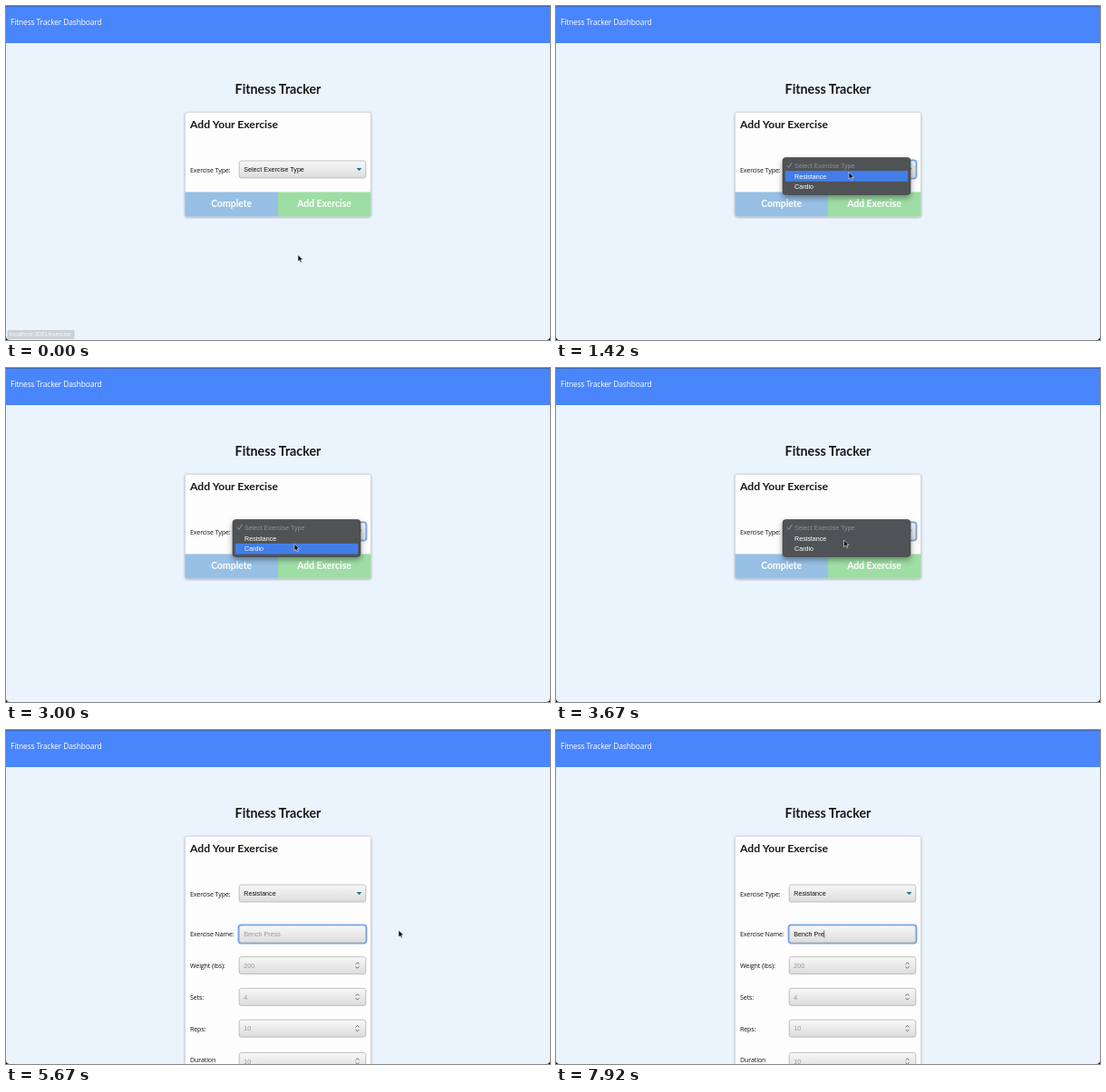
Write an HTML page that moves like this. It is 600 px wide and 369 px high and loops after 8000 ms.

```html
<!DOCTYPE html>
<html lang="en">
<head>
<meta charset="utf-8">
<title>Fitness Tracker</title>
<style>
  html, body { margin: 0; width: 100%; height: 100%; overflow: hidden; background: #000; }
  svg { display: block; width: 100%; height: 100%; }
  text { white-space: pre; }
  .nav { font: 8.5px "Open Sans", "Noto Sans", sans-serif; letter-spacing: -.17px; fill: #fff; }
  .label { font: 7.1px "Open Sans", "Noto Sans", sans-serif; letter-spacing: -.12px; fill: #111; }
  .head { font-family: Lato, sans-serif; font-weight: 700; fill: #17181a; }
  .btn { font: 700 10.4px Lato, sans-serif; fill: #fff; text-anchor: middle; }
  .ui { font: 7.15px "Liberation Sans", Arial, sans-serif; fill: #111; }
  .hint { fill: #999; }
  .item { fill: #fff; }
  .off { fill: #8f9193; }
  .status { font: 6.5px "Liberation Sans", Arial, sans-serif; fill: #fff; }
</style>
</head>
<body>
<svg viewBox="0 0 600 369" preserveAspectRatio="none">
  <defs>
    <linearGradient id="fieldFill" x2="0" y2="1">
      <stop offset="0" stop-color="#f8f8f8"/>
      <stop offset="1" stop-color="#dcdcdc"/>
    </linearGradient>
    <filter id="cardShadow" x="-10%" y="-10%" width="120%" height="125%">
      <feDropShadow dx="0" dy=".7" stdDeviation="1.2" flood-color="#425468" flood-opacity=".5"/>
    </filter>
    <filter id="menuShadow" x="-15%" y="-30%" width="130%" height="190%">
      <feDropShadow dx="0" dy="3" stdDeviation="3" flood-opacity=".38"/>
    </filter>
    <clipPath id="window"><path d="M0 0H600V365Q600 369 596 369H4Q0 369 0 365Z"/></clipPath>
  </defs>
  <rect width="600" height="369"/>
  <g clip-path="url(#window)">
    <rect width="600" height="369" fill="#ebf3fc"/>
    <rect width="600" height="41" fill="#4986fc"/>
    <rect width="600" height=".8" fill="#3a5fa8"/>
    <text class="nav" x="5" y="21.3">Fitness Tracker Dashboard</text>
    <text class="head" x="300" y="96.5" font-size="14.25" text-anchor="middle">Fitness Tracker</text>
    <rect id="card" x="197.5" y="117.5" width="205" height="115" rx="2.5" fill="#fdfdfd" stroke="#ccd1d7" stroke-width=".6" filter="url(#cardShadow)"/>
    <text class="head" x="203" y="134.8" font-size="12.2">Add Your Exercise</text>
    <g id="buttons">
      <path d="M197.5 205.5H300V232.5H200Q197.5 232.5 197.5 230Z" fill="#97c0e4"/>
      <path d="M300 205.5H402.5V230Q402.5 232.5 400 232.5H300Z" fill="#9edda4"/>
      <text class="btn" x="248.7" y="222.3">Complete</text>
      <text class="btn" x="351" y="222.3">Add Exercise</text>
    </g>
    <g id="form"></g>
    <g id="typeField"></g>
    <g id="menu">
      <rect x="250" y="167.5" width="141" height="41" rx="3.5" fill="#505254" stroke="#3b3d3f" stroke-width=".6" filter="url(#menuShadow)"/>
      <rect id="hover" x="252.8" width="135.4" height="11.8" fill="#437de8"/>
      <path d="M255 176.2L256.8 178.4L260.3 173.2" fill="none" stroke="#a3a5a7" stroke-width=".9"/>
      <text class="ui off" x="263" y="178.8">Select Exercise Type</text>
      <text class="ui item" x="263" y="190.6">Resistance</text>
      <text class="ui item" x="263" y="202.4">Cardio</text>
    </g>
    <g id="status">
      <rect x="1.5" y="358" width="74" height="10" rx="1.5" fill="#b9bec4"/>
      <text class="status" x="4" y="365.2">localhost:3001/exercise</text>
    </g>
    <path id="arrow" d="M0 0V7.6L1.8 6L3 8.7L4.3 8.1L3.1 5.5H5.5Z" fill="#000" stroke="#fff" stroke-width=".6"/>
    <path id="beam" d="M-1.5 -4.5Q0 -4.5 0 -3.5Q0 -4.5 1.5 -4.5M0 -3.5V3.5M-1.5 4.5Q0 4.5 0 3.5Q0 4.5 1.5 4.5" fill="none" stroke="#222" stroke-width=".7"/>
  </g>
</svg>
<script>
const LOOP = 8000, FPS = 12;
const OPEN = 750, CLOSE = 3750, FOCUS = 4700, TYPE = 6420;
const $ = id => document.getElementById(id);
const show = (el, on) => el.setAttribute("visibility", on ? "visible" : "hidden");
const move = (el, x, y) => el.setAttribute("transform", `translate(${x} ${y})`);

const field = (y, value, { icon = "", ring = "", cls = "hint", id = "" } = {}) => `
  <rect id="${ring}" x="255.6" y="${y - 1.3}" width="142.8" height="22" rx="4" fill="#6ea2f3" visibility="hidden"/>
  <rect x="257.2" y="${y + .2}" width="139.6" height="19" rx="2.5" fill="url(#fieldFill)" stroke="#a9a9a9" stroke-width=".7"/>
  <text class="ui ${cls}" id="${id}" x="262.3" y="${y + 12.3}">${value}</text>
  ${icon && `<path d="${icon}" transform="translate(0 ${y + 9.7})"/>`}`;
const label = (y, text) => `<text class="label" x="203" y="${y}">${text}</text>`;

const caretDown = 'M386.6 -1.4H392.4L389.5 1.7Z" fill="#18799c';
const spinner = 'M385.6 -1.3L387.5 -3.2L389.4 -1.3M385.6 1.3L387.5 3.2L389.4 1.3" fill="none" stroke="#444" stroke-width=".8';

$("typeField").innerHTML = label(183.6, "Exercise Type:") +
  field(170.8, "", { icon: caretDown, ring: "typeRing", cls: "", id: "typeText" });

const numbers = [["Weight (lbs):", 250.4, 200], ["Sets:", 285.2, 4], ["Reps:", 320, 10]];
$("form").innerHTML = label(228.4, "Exercise Name:") +
  field(215.8, "", { ring: "nameRing", id: "nameText" }) +
  `<rect id="caret" y="221.3" width=".6" height="8.6" fill="#111"/>` +
  numbers.map(([name, y, n]) => label(y + 12.7, name) + field(y, n, { icon: spinner })).join("") +
  label(367.3, "Duration") + field(356.3, 10, { icon: spinner });

// pointer stops: time, x, y
const path = [
  [0, 322, 274.8], [160, 322, 274.8], [600, 324, 181], [900, 324, 181], [1200, 323, 183.3],
  [2000, 323, 185], [2450, 319, 196], [2900, 318, 194.3], [3180, 318, 194.3], [3400, 317.5, 190],
  [3760, 317.5, 190], [4000, 368, 210.8], [4300, 370, 214], [4550, 371, 226], [5150, 371, 226],
  [5550, 433, 221.3], [LOOP, 433, 221.3]
];
const keys = [0, 170, 330, 500, 670, 830, 1030, 1200, 1410];
const phrase = "Bench Press";

function pointer(t) {
  const i = Math.max(1, path.findIndex(p => p[0] > t));
  const [t0, x0, y0] = path[i - 1], [t1, x1, y1] = path[i];
  const k = (t - t0) / (t1 - t0), e = k * k * (3 - 2 * k);
  return [x0 + (x1 - x0) * e, y0 + (y1 - y0) * e];
}

function draw(t) {
  const picked = t >= CLOSE, open = t >= OPEN && !picked;
  const focused = t >= FOCUS, typing = t >= TYPE;
  const [x, y] = pointer(t);

  show($("buttons"), !picked);
  show($("form"), picked);
  $("form").style.display = picked ? "" : "none";
  $("card").setAttribute("height", picked ? 290 : 115);
  $("typeText").textContent = picked ? "Resistance" : "Select Exercise Type";
  show($("typeRing"), t >= OPEN && !focused);

  $("menu").style.display = open ? "" : "none";
  const blink = t >= 3640 && t < 3720;
  show($("hover"), open && y >= 182 && !blink);
  $("hover").setAttribute("y", y < 194 ? 182.1 : 193.9);

  $("status").setAttribute("opacity", Math.max(0, .65 * (1 - t / 250)));

  const count = keys.filter(k => t - TYPE >= k).length;
  const name = $("nameText");
  name.textContent = count ? phrase.slice(0, count) : phrase;
  name.setAttribute("class", count ? "ui" : "ui hint");
  show($("nameRing"), focused);
  show($("caret"), focused && (typing || (t - FOCUS) % 1000 < 500));
  const width = count && picked ? name.getComputedTextLength() : 0;
  $("caret").setAttribute("x", 262.2 + width);

  const inField = picked && y > 216 && x < 397;
  show($("arrow"), !typing && !inField);
  show($("beam"), !typing && inField);
  move($("arrow"), x, y);
  move($("beam"), x, y);
}

const start = performance.now();
function tick() {
  const t = (performance.now() - start) % LOOP;
  draw(Math.floor((t + 4) * FPS / 1000) * 1000 / FPS % LOOP);
  requestAnimationFrame(tick);
}
tick();
</script>
</body>
</html>
```
